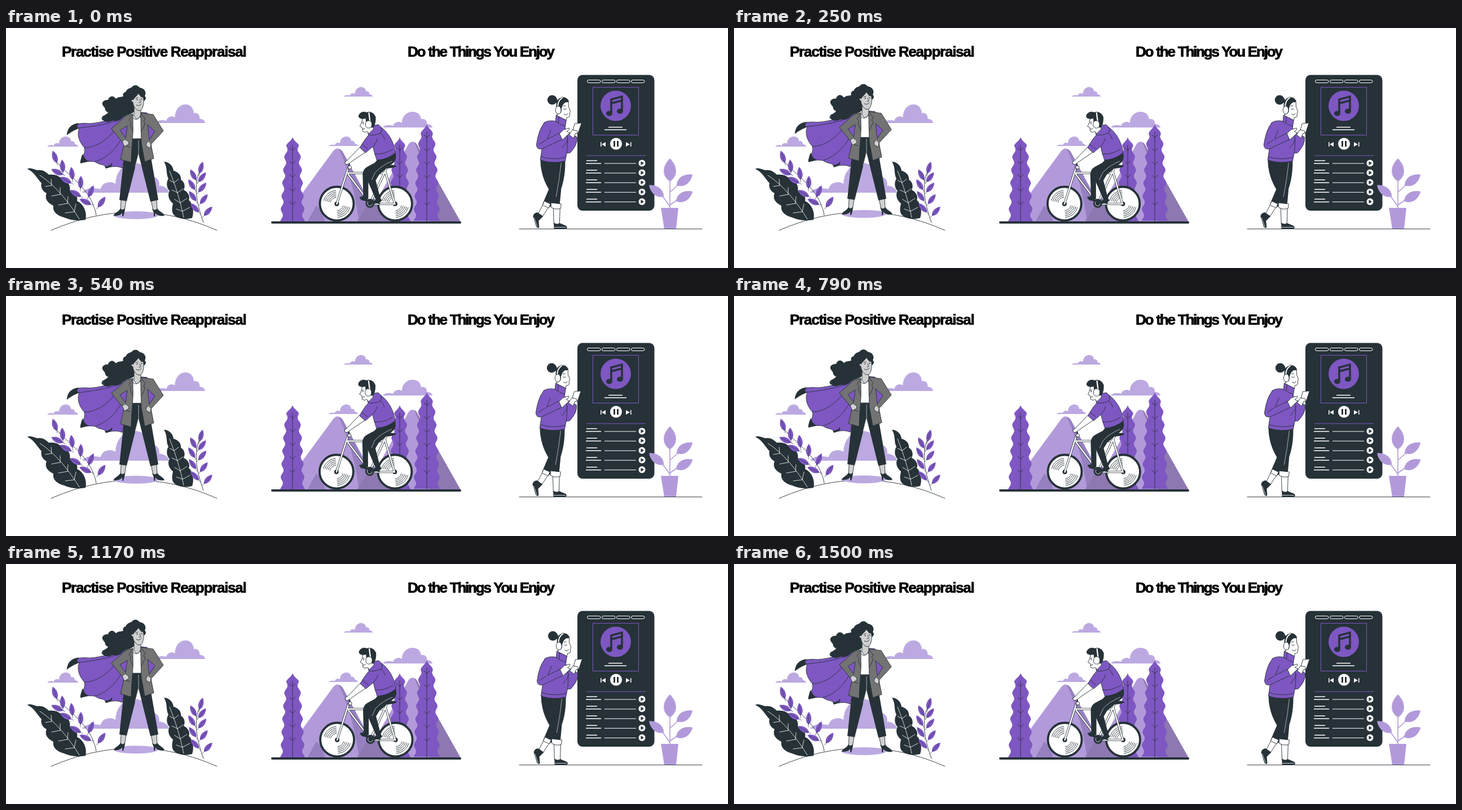
An HTML page that plays this animation: 1280x427 px, repeating every 1540 ms.

```html
<!DOCTYPE html>
<html lang="en">
<head>
<meta charset="utf-8">
<title>Wellbeing</title>
<style>
html, body { margin: 0; width: 100%; height: 100%; overflow: hidden; background: #fff; }
svg { display: block; width: 100%; height: 100%; }
text { font: bold 26px "Liberation Sans", Arial, sans-serif; stroke: #000; stroke-width: .7; }
.d { fill: #263238; } .p { fill: #7e57c2; } .l { fill: #bca9e1; } .m { fill: #b29ada; } .w { fill: #fff; }
.s { fill: #d0d0d0; } .j { fill: #737373; }
.o { stroke: #263238; stroke-width: .9; stroke-linejoin: round; }
.n { fill: none; stroke: #263238; stroke-width: .9; stroke-linecap: round; stroke-linejoin: round; }
.v { fill: none; stroke: #fff; stroke-width: .8; stroke-linecap: round; }
</style>
</head>
<body>
<svg viewBox="0 0 1280 427">
<defs>
  <path id="cloud" d="M0 17C2 14 7 14 11 15C12 11 17 10 20 12C20 5 25 0 31 0S40 4 40 8C44 7 47 10 46 13C49 13 52 15 52 17Z"/>
</defs>
<text x="99" y="51" letter-spacing="-1.25">Practise Positive Reappraisal</text>
<text x="712" y="51" letter-spacing="-2.2" word-spacing="1">Do the Things You Enjoy</text>
<g id="clouds" class="l"></g>

<g id="garden">
  <path class="n" d="M80 360Q228 295 374 360M90 238C106 260 152 285 160 333M345 250C331 280 338 312 350 346"/>
  <path class="d" d="M38 251C42 247 50 252 56 253C66 252 70 256 76 261C86 260 95 262 100 271C110 272 115 281 113 289C122 292 128 300 126 308C138 313 144 328 141 341C128 344 114 342 103 337C90 334 82 326 84 316C73 311 68 303 72 294C64 290 61 282 63 276C55 268 50 256 38 251Z"/>
  <path class="v" d="M60 262C88 280 113 312 130 340M81 280L80 269M81 280L70 282M96 296V284M96 296L81 299M109 312L110 300M109 312L93 315M121 327L124 313M121 327L105 329"/>
  <path class="d" d="M280 238C289 238 296 245 297 254C305 256 311 262 310 270C317 274 318 282 315 288C323 292 327 300 324 306C331 312 334 326 330 338C319 341 307 340 299 334C292 328 295 318 296 312C288 306 286 296 290 290C284 284 284 274 288 268C283 260 287 248 280 238Z"/>
  <path class="v" d="M290 254C300 280 309 307 315 337M298 275L306 269M298 275L290 271M304 293L314 286M304 293L294 288M309 311L321 303M309 311L299 305M313 326L326 319M313 326L302 322"/>
</g>

<g id="hero">
  <ellipse class="l" cx="230" cy="333" rx="40" ry="7"/>
  <path class="p o" d="M224 154C200 158 170 169 148 170C130 168 113 171 108 190C116 184 124 180 130 178C125 190 130 203 139 213C142 225 132 232 132 239C142 237 151 237 158 238C167 245 173 241 178 248C186 248 194 244 206 249L218 200Z"/>
  <path class="d" d="M130 169C113 171 109 180 108 190C116 184 124 180 130 178C125 177 125 173 130 169ZM136 224Q140 236 148 237L132 241Q132 232 136 224ZM175 246Q183 247 188 240Q190 247 177 250Z"/>
  <path class="n" d="M130 178C155 175 180 171 202 163M139 213C160 213 182 198 197 176M158 238C181 230 194 215 203 200"/>
  <path class="p o" d="M238 150L250 151L258 172L252 206H241Z"/>
  <path class="d" d="M212 114C215 106 224 107 224 104C228 101 234 102 237 106C245 107 250 114 246 121C250 124 247 130 243 130L228 148C221 156 212 153 207 159C200 169 190 163 186 166C179 169 171 166 172 161C171 155 178 155 181 150C174 148 177 142 173 139C167 133 174 127 181 128C182 121 191 121 195 126C200 121 206 124 208 121C206 118 209 114 212 114Z"/>
  <path class="n" style="stroke-width:2" d="M231 110C236 106 234 101 226 104M176 141C169 136 175 130 181 132M184 129C182 121 191 121 193 126M176 164C167 164 170 156 178 156"/>
  <path class="s o" d="M227 140V157L233 164L239 155V143Z"/>
  <path class="s o" d="M226 122C230 116 241 114 243 122C246 132 243 147 236 147C229 146 225 137 225 132C220 130 222 124 226 126Z"/>
  <path class="d" d="M222 128C218 117 226 109 236 111C244 112 247 118 245 124C238 123 236 119 235 116C232 122 228 123 226 128Z"/>
  <path class="n" d="M230 125L234 124M239 123L242 123M237 127L239 132L236 133M231 137Q236 140 240 135"/>
  <circle class="d" cx="232.500" cy="127.500" r="1"/><circle class="d" cx="240.500" cy="126.500" r="1"/>
  <path class="s o" d="M204 306L203 325L210 325L213 306ZM257 306L261 325L268 324L267 306Z"/>
  <path class="d" d="M191 334C193 328 199 328 203 321Q207 326 211 320L210 328L208 335H206L206 329Q202 335 191 334ZM281 334C279 328 273 328 268 321Q264 326 259 321L262 329L262 335H264L265 329Q269 336 281 334Z"/>
  <path class="d" d="M222 194H242L257 230L270 306L256 309L235 224L214 308L201 306L209 230Z"/>
  <path class="n" style="stroke:#fff;stroke-width:.6" d="M235 200V223L229 247"/>
  <path class="w o" d="M224 159Q231 167 239 157L241 197H222Z"/>
  <path class="j o" d="M225 153L213 156L187 179L206 203L211 199L203 234L222 239C222 214 226 192 225 170Z"/>
  <path class="j o" d="M239 151L261 154L279 183L257 207L262 232L246 238L240 205L239 172Z"/>
  <path class="p o" d="M215 174L202 182L212 196ZM251 172L264 184L254 199Z"/>
  <path class="n" d="M225 153L218 164L222 168L220 172L225 184M239 151L247 162L244 166L247 170L240 184M210 209L220 212M249 211L258 208"/>
  <path class="s o" d="M206 202L211 198Q220 203 217 207L210 211ZM257 206L252 201Q246 208 250 211L256 214Z"/>
</g>

<g id="hills">
  <path class="m" d="M488 345L580 219Q587 210 594 218L664 345ZM635 345L714 206Q721 198 728 207L806 345Z"/>
  <path fill="#9780c0" d="M590 215Q594 215 598 222L664 345H626Q616 270 590 215ZM534 345L550 316Q560 322 566 345Z"/>
  <path fill="#8e78b1" d="M724 203Q728 205 730 210L806 345H750Q755 270 724 203ZM622 345L650 300L690 345Z"/>
</g>
<path stroke="#263238" stroke-width="4" stroke-linecap="round" d="M472 346H805"/>

<g id="rider">
  <g id="wheels"></g>
  <path class="n" style="stroke-width:4" d="M606 250L586 313M606 258H672M606 260L645 312L674 250M672 256L689 313H645"/>
  <path class="v" style="stroke-width:2.400" d="M606 250L586 313M606 258H672M606 260L645 312L674 250M672 256L689 313H645"/>
  <path class="n" style="stroke-width:2.600" d="M602 238Q611 239 607 251"/>
  <circle class="w o" cx="609" cy="248" r="3"/>
  <path class="d" d="M670 244Q682 242 692 245Q690 249 675 250ZM664 234L640 247Q631 252 632 264L633 299L626 301Q627 306 638 308L642 303V270L656 255Z"/>
  <circle class="d" cx="645" cy="312" r="8"/><circle class="v" cx="645" cy="312" r="4.500"/>
  <path class="n" style="stroke-width:2.500" d="M630 305L662 312"/>
  <path class="d" d="M690 222Q693 235 686 240L661 261L655 271L663 302L666 307Q662 313 647 313L655 305L640 270Q636 258 645 250L659 233Z"/>
  <path class="v" style="stroke-width:.6" d="M684 237Q666 244 654 257L648 270"/>
  <path class="w o" d="M628 211L605 235Q599 238 601 242Q606 244 610 239L638 220L634 210Z"/>
  <path class="p o" d="M646 187C637 195 631 206 627 213L637 222L650 211Q653 224 657 235Q676 234 690 222C688 204 678 186 664 176L652 178Z"/>
  <path class="p o" d="M641 185Q647 172 660 172Q669 179 664 187Q652 192 642 190Z"/>
  <path class="n" d="M650 211Q657 203 658 197M653 224Q668 226 685 216M631 207L641 215M664 187Q670 192 671 198"/>
  <path class="w o" d="M632 160L630 169L627 175L631 177L632 184Q636 187 640 184L643 188L651 180L650 160Z"/>
  <path class="d" d="M632 162Q621 160 626 153Q631 147 639 150Q650 147 655 158Q656 169 651 177L646 177L644 168L638 170L637 161Z"/>
  <path class="n" d="M631 168L634 167M632 180L636 179"/><circle class="d" cx="633" cy="170" r="1"/>
  <path class="n" style="stroke-width:3.500" d="M643 151L645 167"/><path class="v" style="stroke-width:2.200" d="M643 151L645 167"/>
  <rect class="w o" x="637" y="165" width="11" height="13" rx="5"/>
</g>

<g id="panel">
  <rect class="d" x="1013" y="83.500" width="136.500" height="241.500" rx="9"/>
  <rect fill="none" stroke="#7e57c2" x="1040.500" y="105.500" width="81" height="85"/>
  <circle class="p" cx="1081" cy="138.500" r="27"/>
  <path fill="none" stroke="#263238" stroke-width="3.500" d="M1073 152V127L1092 122V148M1073 134L1092 129"/>
  <ellipse class="d" cx="1069.500" cy="152" rx="5.500" ry="4.500"/><ellipse class="d" cx="1088.500" cy="148" rx="5.500" ry="4.500"/>
  <path stroke="#fff" stroke-width="1.600" d="M1068 176.500H1093M1061 181H1100"/>
  <circle class="w" cx="1081.500" cy="206" r="10.500"/>
  <path class="d" d="M1077 201h3v10h-3ZM1083 201h3v10h-3Z"/>
  <path class="w" d="M1054 203h1.500v8h-1.500ZM1063 203v8l-7-4ZM1099 203v8l7-4ZM1107 203h1.500v8h-1.500Z"/>
  <path stroke="#7e57c2" d="M1029 227H1134"/>
</g>

<path class="n" d="M910 357.500H1234"/>
<g id="plant" class="m">
  <path d="M1161 320H1192L1188 357H1167Z"/>
  <path fill="none" stroke="#b29ada" stroke-width="1.600" d="M1177 320V260M1177 317L1160 294M1177 292L1195 276M1177 315L1195 302"/>
</g>

<g id="walker">
  <path class="w o" d="M953 311L943 331L951 335L964 315ZM970 318L971 349H981L982 318Z"/>
  <path class="d" d="M942 328Q935 329 934 335L940 354Q944 358 945 354L944 343L952 335ZM971 346Q976 351 981 347L993 352Q997 357 991 357H971Z"/>
  <path class="v" d="M936 338L942 354M972 354.500H992"/>
  <path class="d" d="M947 233L991 234Q992 262 984 286L981 318L967 316L963 319L951 313L962 287Q947 262 947 233Z"/>
  <path class="w o" d="M966 311L984 313L983 321Q974 324 966 319ZM954 308L965 313L962 320L951 315Z"/>
  <path class="v" style="stroke-width:.6" d="M984 240Q981 268 975 300"/>
  <path class="p o" d="M998 186L1012 194Q1014 207 1000 222L986 224L991 199Z"/>
  <path class="p o" d="M975 155L993 164L991 177Q1000 200 991 237Q968 242 947 235L950 213Q944 186 954 168Q964 163 974 166Z"/>
  <path class="p o" d="M954 169Q944 180 940 208Q941 217 950 215L986 198L981 187L959 198L966 181"/>
  <path class="n" d="M974 166Q982 172 991 175M948 229Q970 236 992 230M945 207L957 199M980 158L979 168M986 213Q995 204 996 196"/>
  <path class="w o" d="M1008 170L1020 169L1014 187L1003 188Z"/>
  <path class="w o" d="M981 188L988 181L998 178Q1000 181 994 184L999 187L986 199ZM998 190L1004 181L1012 183Q1015 187 1009 188L1006 196Z"/>
  <path class="w o" d="M977 147V156L993 164L994 159Q1000 160 999 153L1000 147L997 140L997 130L985 129Z"/>
  <path class="d" d="M976 146Q973 130 981 125Q992 120 997 129Q998 133 992 132Q985 136 984 148L978 154Z"/>
  <circle class="d" cx="968" cy="128" r="8.500"/><path class="d" d="M968 123L977 126L978 133L966 134Z"/>
  <path class="n" style="stroke-width:3.200" d="M986 124Q977 130 978 142"/><path class="v" style="stroke-width:2" d="M986 124Q977 130 978 142"/>
  <ellipse class="w o" cx="979" cy="146" rx="5" ry="7"/><path class="n" d="M982 141Q986 146 982 152"/>
  <path class="n" d="M988 144Q990 146 993 144M988 139L992 138M989 153Q993 157 996 152"/>
</g>
</svg>
<script>
const T = 1540;
const $ = id => document.getElementById(id);
const add = (id, markup) => $(id).insertAdjacentHTML('beforeend', markup);
const svgPath = (d, cls, extra = '') => `<path class="${cls}" d="${d}" ${extra}/>`;

// Clouds: left, top, width, height
for (const [x, y, w, h] of [[599, 105, 51, 17], [572, 193, 52, 17], [668, 149, 88, 28],
  [266, 136, 87, 33], [73, 193, 55, 18], [135, 240, 154, 53]])
  add('clouds', `<use href="#cloud" transform="translate(${x} ${y}) scale(${w / 52} ${h / 17})"/>`);

// A leaf grows from its base along an angle in degrees
function leaf(id, x, y, len, angle, width, cls, vein) {
  const shape = `M0 0C${len * .25} ${-width} ${len * .7} ${-width * .8} ${len} 0C${len * .7} ${width * .8} ${len * .25} ${width} 0 0Z`;
  add(id, `<g transform="translate(${x} ${y}) rotate(${angle})">${svgPath(shape, cls)}` +
    (vein ? svgPath(`M-4 0H${len * .8}`, 'n', 'style="stroke-width:.6"') : '') + '</g>');
}
for (const [x, y, a] of [[90, 240, -108], [101, 257, -94], [118, 270, -96], [132, 286, -88], [146, 301, -66],
  [101, 261, 205], [116, 276, 208], [133, 300, 210], [151, 314, 205], [163, 319, -55]])
  leaf('garden', x, y, 23, a, 7, 'p', true);
for (const [x, y, a] of [[343, 259, -75], [337, 271, -118], [341, 274, -52], [335, 288, -122], [341, 292, -50],
  [337, 308, -125], [344, 313, -52], [342, 328, -132], [351, 334, -48]])
  leaf('garden', x, y, 22, a, 6.5, 'p', true);
for (const [x, y, len, a, w] of [[1177, 273, 41, -90, 16], [1189, 280, 34, -34, 12],
  [1188, 308, 34, -30, 12], [1166, 300, 33, 218, 11]])
  leaf('plant', x, y, len, a, w, 'm');

function tree(x, top, width) {
  const left = [], right = [], base = 344;
  for (let y = top; y <= base; y += 2) {
    const k = (y - top) / (base - top), ease = Math.min(1, k * 10);
    const half = ease * (width * (.25 + .65 * Math.sqrt(k)) - 2.2 * Math.cos((y - top) / 3.7));
    left.push(`${x - half} ${y}`);
    right.unshift(`${x + half} ${y}`);
  }
  let veins = `M${x} ${top + 14}V${base}`;
  for (let y = top + 24; y < base - 8; y += 24) veins += `M${x - 5} ${y - 5}L${x} ${y}L${x + 5} ${y - 5}`;
  add('hills', svgPath(`M${left.join('L')}L${right.join('L')}Z`, 'p') + svgPath(veins, 'n'));
}
tree(508, 194, 22);
tree(698, 194, 19);
tree(746, 171, 24);

for (const x of [586, 689.5]) {
  let arcs = '';
  for (const r of [12, 15, 18, 21, 24]) {
    const a = r * .26, b = r * .966;
    arcs += `M${x - b} ${313 - a}A${r} ${r} 0 0 1 ${x - a * .3} ${313 - r}M${x + b} ${313 + a}A${r} ${r} 0 0 1 ${x + a * .3} ${313 + r}`;
  }
  add('wheels', `<circle class="w" cx="${x}" cy="312.500" r="30" stroke="#263238" stroke-width="3.800"/>` +
    svgPath(arcs, 'n') + `<circle class="d" cx="${x}" cy="313" r="4"/>`);
}

for (let i = 0; i < 4; i++)
  add('panel', `<rect fill="none" stroke="#fff" x="${1030.5 + i * 26}" y="92.500" width="23.500" height="5" rx="2.500"/>`);
for (let i = 0; i < 5; i++) {
  const y = 240.5 + i * 17.1;
  add('panel', `<path stroke="#fff" stroke-width="1.500" d="M1028 ${y + .5}H1055M1029 ${y - 4.5}H1048"/>` +
    `<path stroke="#fff" d="M1061 ${y + .5}H1117"/><circle class="w" cx="1127.500" cy="${y}" r="6"/>` +
    svgPath(`M1125.500 ${y - 3.5}V${y + 3.5}L1131 ${y}Z`, 'd'));
}

const move = (id, x, y) => $(id).setAttribute('transform', `translate(${x} ${y})`);
function frame(now) {
  const t = now % T / T;
  const sway = -Math.sin(2 * Math.PI * t);
  // The rise is a little quicker than the fall
  move('hero', 0, -3.5 * (1 - Math.cos(2 * Math.PI * t ** .9)));
  move('rider', .4 + .7 * sway, 0);
  move('walker', .3 + 1.2 * sway, 0);
  requestAnimationFrame(frame);
}
frame(performance.now());
</script>
</body>
</html>
```
